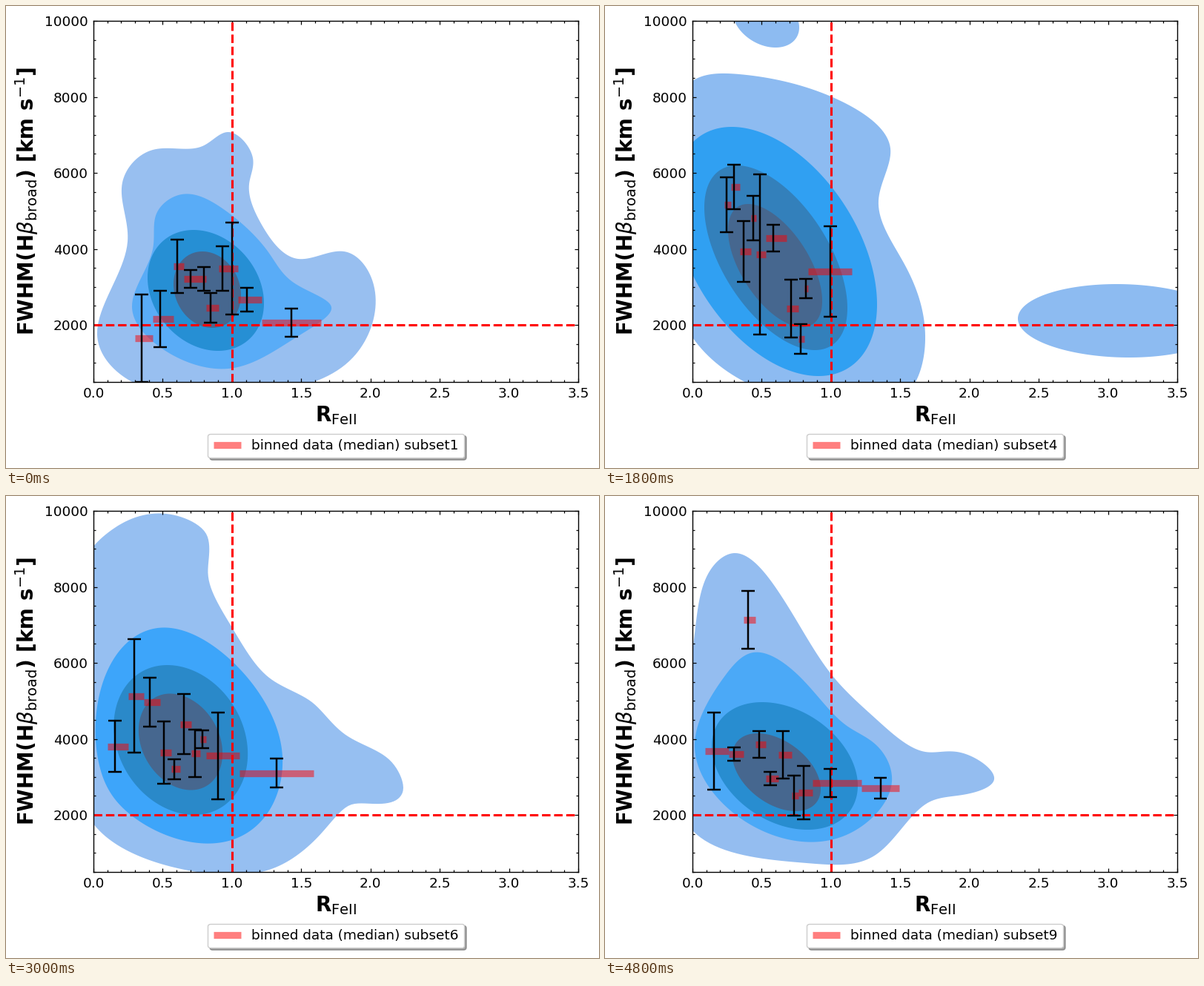
Animation, 800 px wide and 623 px high, one loop 5400 ms. Source, as a matplotlib script:

```python
import matplotlib.pyplot as plt
import numpy as np
from matplotlib.animation import FuncAnimation
from matplotlib.collections import LineCollection, PolyCollection
from matplotlib.colors import to_rgb
from matplotlib.lines import Line2D
from matplotlib.ticker import AutoMinorLocator

W, H, DPI = 800, 623, 100
LEFT, RIGHT, TOP, BOTTOM = 118, 772, 20, 507
XMAX, YMIN, YMAX = 3.5, 500, 10000
CORE = "#46678f"
U = 1.11  # size of one point unit in the plot

levels, islands, bars, shades = {}, {}, {}, {}


def oval(left, top, right, bottom, peak):
    """Slanted ellipse from its bounding box and the x of its highest point."""
    cx, cy = (left + right) / 2, (top + bottom) / 2
    rx, ry = (right - left) / 2, (bottom - top) / 2
    t = np.linspace(0, 2 * np.pi, 240, endpoint=False)
    slant = np.arcsin((cx - peak) / rx)
    return np.column_stack([cx + rx * np.cos(t), cy + ry * np.sin(t + slant)])


def spline(*xy, steps=20):
    """Closed cubic spline through a few key points, given clockwise."""
    p = np.array(xy, float).reshape(-1, 2)
    q = np.roll(p, -1, 0)
    h = np.hypot(*(q - p).T) ** 0.75
    g = np.roll(h, 1)
    n = len(p)
    i = np.arange(n)
    a = np.zeros((n, n))
    a[i, i] = 2 * (h + g)
    a[i, (i + 1) % n] = h
    a[i, i - 1] = g
    slope = (q - p) / h[:, None]
    k = np.linalg.solve(a, 6 * (slope - np.roll(slope, 1, 0)))
    t = np.linspace(0, 1, steps, endpoint=False)[None, :, None]
    u = 1 - t
    bend = (u**3 - u) * k[:, None] + (t**3 - t) * np.roll(k, -1, 0)[:, None]
    curve = u * p[:, None] + t * q[:, None] + h[:, None, None] ** 2 / 6 * bend
    return curve.reshape(-1, 2)


def even(p, n=300):
    """Resample an outline at equal arc lengths, starting from its top."""
    p = np.roll(p, -np.argmin(p[:, 1]), 0)
    p = np.vstack([p, p[:1]])
    s = np.r_[0, np.cumsum(np.hypot(*np.diff(p, axis=0).T))]
    at = np.linspace(0, s[-1], n, endpoint=False)
    return np.column_stack([np.interp(at, s, p[:, j]) for j in (0, 1)])


def to_data(p):
    p = np.asarray(p, float)
    x = (p[..., 0] - LEFT) / (RIGHT - LEFT) * XMAX
    y = YMIN + (BOTTOM - p[..., 1]) / (BOTTOM - TOP) * (YMAX - YMIN)
    return np.stack([x, y], -1)


def density(k, blues, *outlines, extra=()):
    """Nested outlines from the outermost inwards, plus detached islands."""
    shades[k] = np.array([to_rgb(c) for c in blues.split() + [CORE]])
    levels[k] = outlines
    islands[k] = list(extra)


def binned(k, edges, mid, half):
    bars[k] = [np.array(v, float) for v in (edges, mid, half)]


def between(k, a, b):
    levels[k] = [(even(p) + even(q)) / 2 for p, q in zip(levels[a], levels[b])]
    bars[k] = [(p + q) / 2 for p, q in zip(bars[a], bars[b])]
    shades[k] = (shades[a] + shades[b]) / 2


density(1, "#98bff0 #59acf7 #268fd4",
        spline(300, 170, 333, 205, 328, 240, 345, 295, 394, 341, 456, 331,
               496, 376, 468, 474, 330, 524, 165, 504, 123, 443, 164, 318,
               157, 238, 198, 194, 265, 189),
        spline(237, 254, 292, 273, 354, 332, 388, 373, 439, 406, 396, 444,
               300, 489, 205, 458, 170, 405, 198, 328, 203, 280),
        oval(191, 302, 348, 465, 253),
        oval(226, 331, 317, 434, 265))
binned(1, [174, 198, 226, 240, 266, 270, 287, 300, 313, 345, 425],
       [448, 422, 351, 368, 368, 407, 354, 354, 396, 427],
       [59, 38, 36, 12, 16, 20, 30, 62, 16, 19])

density(3, "#81b6f4 #2b98e5 #3380bb",
        spline(187, 78, 280, 110, 370, 210, 430, 308, 500, 430, 510, 510,
               400, 570, 222, 505, 118, 371, 80, 240, 118, 121),
        spline(222, 156, 295, 182, 346, 262, 415, 365, 446, 445, 415, 475,
               375, 474, 300, 507, 225, 470, 160, 370, 141, 275, 170, 185),
        spline(240, 208, 290, 228, 325, 284, 366, 350, 384, 400, 340, 434,
               285, 475, 220, 430, 175, 345, 172, 285, 200, 222),
        oval(198, 277, 341, 445, 243),
        extra=[oval(562, 405, 635, 489, 577)])
binned(3, [144, 187, 203, 237, 257, 267, 283, 297, 331, 368, 430],
       [310, 222, 326, 424, 318, 429, 389, 346, 377, 418],
       [99, 25, 21, 47, 48, 58, 54, 47, 12, 12])

density(4, "#8dbbf1 #30a0f2 #3380bb",
        spline(181, 92, 320, 129, 385, 192, 369, 262, 405, 350, 432, 450,
               400, 530, 230, 525, 118, 447, 70, 250, 118, 101),
        oval(92, 163, 367, 499, 171),
        oval(134, 215, 327, 464, 178),
        oval(166, 267, 293, 433, 193),
        extra=[oval(172, -20, 262, 56, 204), oval(557, 375, 840, 474, 690)])
binned(4, [161, 170, 182, 197, 204, 217, 245, 261, 269, 274, 333],
       [268, 244, 331, 286, 335, 313, 408, 449, 381, 358],
       [37, 30, 41, 30, 108, 18, 39, 20, 13, 61])

density(5, "#94bff1 #38a5fa #2a88c5",
        spline(275, 57, 319, 93, 289, 150, 330, 222, 398, 285, 470, 294,
               515, 342, 580, 377, 580, 424, 528, 416, 480, 385, 436, 430,
               380, 490, 270, 509, 118, 476, 92, 340, 118, 268, 167, 172,
               144, 108, 190, 74),
        spline(243, 220, 326, 262, 386, 372, 350, 445, 255, 471, 150, 435,
               133, 395, 183, 260),
        oval(165, 262, 342, 442, 248),
        oval(202, 297, 311, 418, 252))
binned(5, [141, 167, 193, 225, 242, 249, 272, 280, 287, 306, 367],
       [395, 332, 312, 396, 355, 308, 364, 357, 405, 363],
       [5, 84, 35, 32, 8, 28, 42, 10, 80, 21])

density(7, "#98bff1 #42a5f9 #2a8acc",
        spline(235, 20, 263, 82, 302, 183, 386, 291, 475, 351, 500, 393,
               456, 441, 405, 490, 280, 516, 118, 408, 60, 200, 118, 0),
        oval(94, 135, 365, 466, 180),
        oval(122, 194, 314, 418, 187),
        oval(153, 236, 276, 375, 191),
        extra=[oval(641, 330, 710, 398, 659)])
binned(7, [132, 163, 179, 190, 203, 220, 229, 244, 252, 325, 463],
       [280, 207, 243, 296, 381, 307, 329, 299, 295, 384],
       [64, 69, 31, 52, 19, 53, 22, 14, 37, 18])

density(9, "#94bdf0 #4ba9f7 #288dd0",
        spline(175, 77, 236, 132, 305, 240, 366, 301, 432, 345, 480, 346,
               525, 382, 488, 402, 435, 414, 365, 484, 272, 495, 118, 451,
               92, 340, 118, 208, 142, 100),
        spline(200, 211, 260, 241, 325, 309, 365, 335, 387, 385, 330, 455,
               235, 460, 150, 405, 121, 335, 160, 245),
        oval(144, 278, 341, 450, 212),
        oval(172, 320, 291, 425, 206))
binned(9, [135, 167, 187, 203, 217, 234, 252, 261, 280, 346, 397],
       [344, 348, 167, 335, 381, 349, 404, 400, 387, 394],
       [52, 9, 39, 18, 9, 32, 27, 36, 19, 14])

between(2, 1, 3)
between(6, 5, 7)
between(8, 7, 9)

fig = plt.figure(figsize=(W / DPI, H / DPI), dpi=DPI, facecolor="white")
ax = fig.add_axes([LEFT / W, 1 - BOTTOM / H, (RIGHT - LEFT) / W, (BOTTOM - TOP) / H])
ax.set(xlim=(0, XMAX), ylim=(YMIN, YMAX), yticks=range(2000, 10001, 2000))
ax.xaxis.set_minor_locator(AutoMinorLocator(5))
ax.yaxis.set_minor_locator(AutoMinorLocator(4))
ax.tick_params(which="both", direction="in", top=True, right=True,
               width=0.8 * U, labelsize=12 * U, pad=4.4 * U)
ax.tick_params(which="major", length=3.5 * U)
ax.tick_params(which="minor", length=2 * U)
for spine in ax.spines.values():
    spine.set_linewidth(0.9 * U)

label = dict(size=18 * U, weight="bold", ha="center", va="baseline")
fig.text(445 / W, 1 - 560 / H, r"R$_{\rm FeII}$", **label)
fig.text(38 / W, 1 - 263.5 / H, r"FWHM(H$\beta_{\rm broad}$) [km s$^{-1}$]",
         rotation=90, rotation_mode="anchor", **label)

fills = ax.add_collection(PolyCollection([], zorder=1, edgecolors="none"), autolim=False)
dashes = dict(color="red", ls="--", lw=2 * U, zorder=2.1)
ax.axvline(1, **dashes)
ax.axhline(2000, **dashes)
red = dict(color="red", alpha=0.5, lw=6 * U)
medians = ax.add_collection(LineCollection([], zorder=2.2, capstyle="butt", **red),
                            autolim=False)
errors = ax.add_collection(LineCollection([], zorder=2.3, color="black", lw=1.6 * U),
                           autolim=False)

key = Line2D([], [], solid_capstyle="butt", **red)
legend = ax.legend([key], ["binned data (median) subset1"], loc="center",
                   bbox_to_anchor=(445.2 / W, 1 - 593 / H),
                   bbox_transform=fig.transFigure, fontsize=12 * U,
                   shadow=True, fancybox=True, borderaxespad=0)
caption = legend.get_texts()[0]


def error_bar(x, y, half, cap=9):
    ends = y - half, y + half
    return [[(x, ends[0]), (x, ends[1])]] + [[(x - cap, v), (x + cap, v)] for v in ends]


def draw(frame):
    k = frame + 1
    extra = islands.get(k, [])
    fills.set_verts([to_data(p) for p in [*extra, *levels[k]]])
    fills.set_facecolor([shades[k][0]] * len(extra) + list(shades[k]))

    edges, mid, half = bars[k]
    start, end = edges[:-1], edges[1:]
    medians.set_segments([to_data([(a, y), (b, y)]) for a, b, y in zip(start, end, mid)])

    # Errors stand a little left of each bin's middle, except in the last bin.
    at = start + 0.36 * (end - start)
    at[-1] = (start[-1] + end[-1]) / 2
    errors.set_segments([to_data(s) for bar in zip(at, mid, half)
                         for s in error_bar(*bar)])

    caption.set_text(f"binned data (median) subset{k}")
    return fills, medians, errors, caption


anim = FuncAnimation(fig, draw, frames=9, interval=600, repeat=True, repeat_delay=0)
plt.show()
```
